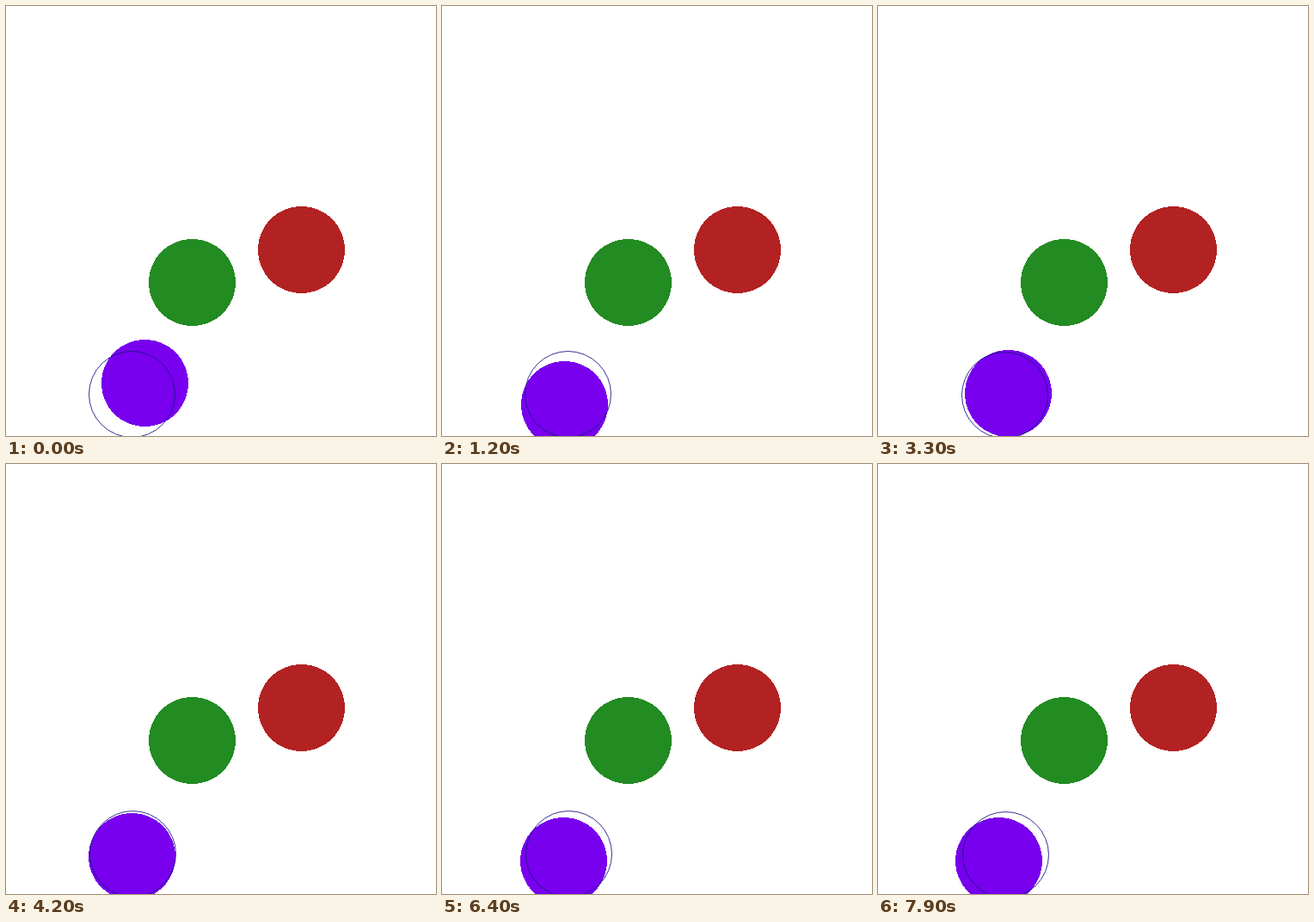
An HTML page for the animation above (8000 ms loop, 500 by 500 pixels).

```html
<!DOCTYPE html>
<html lang="en">
<head>
<meta charset="utf-8">
<title>Circles</title>
<style>
  html, body { margin: 0; width: 100%; height: 100%; overflow: hidden; background: #fff; }
  svg { display: block; width: 100vw; height: 100vh; }
</style>
</head>
<body>
<svg viewBox="0 0 500 500">
  <g shape-rendering="crispEdges">
    <circle cx="343.5" cy="283.5" r="50.5" fill="#b22222"/>
    <circle cx="216.5" cy="321.5" r="50.5" fill="#228b22"/>
    <circle id="ball" r="50.5" fill="#7800ee"/>
  </g>
  <circle id="ring" r="50" fill="none" stroke="#191987" stroke-width="0.9"/>
</svg>
<script>
const LOOP = 8000, STEP = 100;

// The ball swings between turning points; the ring makes two small shifts.
const swing = [
  { t: 0, x: 161, y: 438 },
  { t: 1560, x: 139, y: 467 },
  { t: 3500, x: 151, y: 450 },
  { t: 5500, x: 131, y: 471 },
  { t: 6900, x: 145, y: 457 },
  { t: 8400, x: 138, y: 462 }
];
const drift = [
  { t: 2400, x: 146, y: 451 },
  { t: 4200, x: 147, y: 453 },
  { t: 6400, x: 147, y: 453 },
  { t: 7200, x: 148, y: 454 }
];

const ball = document.getElementById('ball');
const ring = document.getElementById('ring');

const clamp = u => Math.min(1, Math.max(0, u));
const ease = u => (1 - Math.cos(Math.PI * u)) / 2;

// Sine easing from each key point to the next
function position(keys, t) {
  const next = keys.findIndex(key => key.t > t);
  const i = next < 0 ? keys.length - 1 : Math.max(1, next);
  const a = keys[i - 1], b = keys[i];
  const k = ease(clamp((t - a.t) / (b.t - a.t)));
  return { x: a.x + (b.x - a.x) * k, y: a.y + (b.y - a.y) * k };
}

// Centres sit on whole pixels.
function place(circle, { x, y }) {
  circle.setAttribute('cx', Math.round(x) + 0.5);
  circle.setAttribute('cy', Math.round(y) + 0.5);
}

function render(ms) {
  const t = Math.floor((ms % LOOP) / STEP) * STEP;
  place(ball, position(swing, t));
  place(ring, position(drift, t));
}

const start = performance.now();
function tick() {
  render(performance.now() - start);
  requestAnimationFrame(tick);
}
tick();
</script>
</body>
</html>
```
